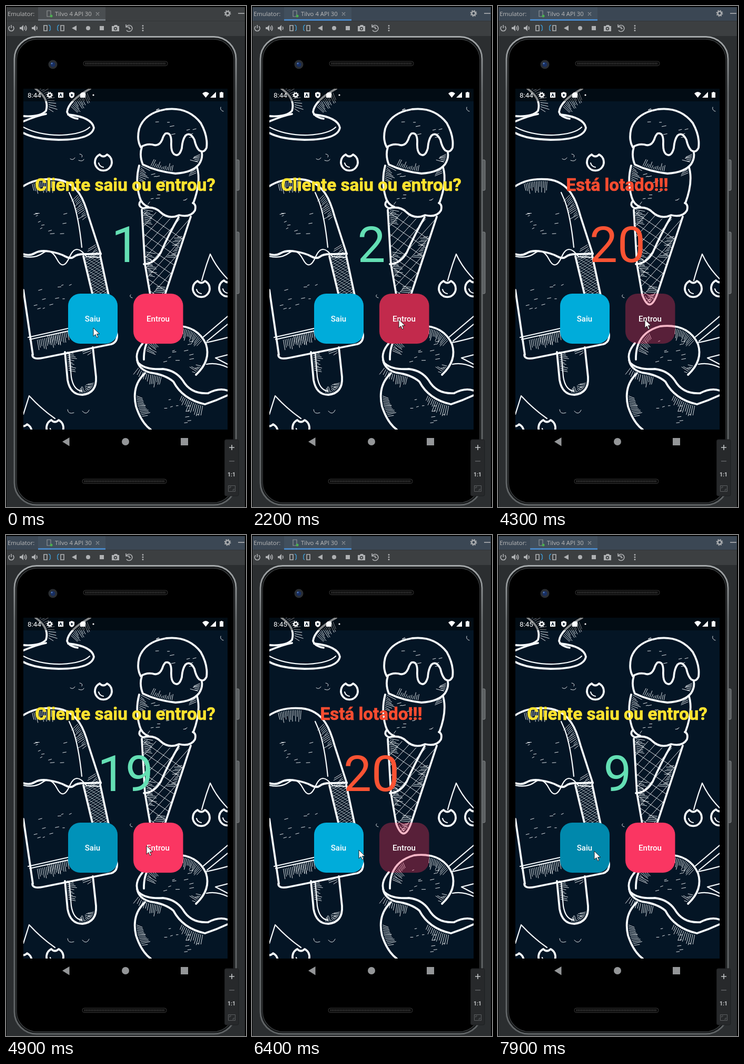
Write an HTML page that moves like this. It is 456x951 px and loops after 8 s.

```html
<!DOCTYPE html>
<html lang="pt">
<head>
<meta charset="utf-8">
<style>
html, body { margin: 0; width: 100%; height: 100%; overflow: hidden; background: #000 }
svg { display: block; width: 456px; height: 951px; font-family: Roboto, sans-serif }
.line { fill: none; stroke: #f6fafc; stroke-width: 3.8; stroke-linecap: round; stroke-linejoin: round }
.mid { stroke-width: 2.2 }
.thin { stroke-width: .9 }
.ui { font: 11.3px "Open Sans", sans-serif; fill: #bbb }
.icon { fill: none; stroke: #afb1b3; stroke-width: 1.6 }
.solid { fill: #afb1b3; stroke: none }
.mesh { fill: #080808; stroke: #353535 }
.dots { stroke: #3b3b3b; stroke-width: 4; stroke-dasharray: 1.5 1.5 }
.label { font-size: 15.1px; font-weight: 500; fill: #fff }
.center { text-anchor: middle }
#title { font-size: 33.2px; font-weight: 700; stroke-width: .7 }
</style>
</head>
<body>
<svg viewBox="0 0 456 951">
  <defs>
    <clipPath id="screen"><path d="M33 157H421V804H33Z"/></clipPath>
    <clipPath id="cone"><path d="M258 387L264 490L274 548Q288 580 302 548L351 400Q310 412 295 393Z"/></clipPath>
    <clipPath id="side"><path d="M148 474L180 472L195 548H164Z"/></clipPath>
    <linearGradient id="rim" x2="0" y2="1">
      <stop stop-color="#a4a8aa"/><stop offset=".12" stop-color="#6a6e70"/><stop offset="1" stop-color="#606466"/>
    </linearGradient>
    <g id="cherry">
      <path d="M-7 -14A16 16 0 1 0 7 -14Q0 -7 -7 -14"/>
      <path class="mid" d="M-9 2Q-7 9 0 10"/>
    </g>
  </defs>

  <!-- emulator window -->
  <path fill="#2b2e30" d="M1 57H454V951H1Z"/>
  <path fill="#3c3f41" d="M1 2H454V57H1Z"/>
  <path id="bar" d="M1 2H454V28H1Z"/>
  <path id="tab" d="M61 2H189V28H61Z"/>
  <path id="underline" d="M61 25H189V28H61Z"/>
  <path stroke="#323537" d="M1 28.5H454"/>
  <text class="ui" x="3" y="19">Emulator:</text>
  <text class="ui" x="93" y="19">Tilvo 4 API 30</text>
  <g class="icon">
    <path stroke-width="1.2" d="M78 9H85V20H78ZM171 12L177 18M177 12L171 18" opacity=".7"/>
    <circle cx="86" cy="19" r="2.5" fill="#4caf50" stroke="none"/>
    <circle cx="421" cy="14" r="3.6" stroke-width="2.4"/>
    <circle cx="421" cy="14" r="5.6" stroke-dasharray="2.2 2.2"/>
    <path d="M441 14H453"/>
    <path d="M7 38.5A5 5 0 1 0 13 38.5M10 36V42"/>
    <path class="solid" d="M26 40H29L33 36V48L29 44H26ZM49 40H52L56 36V48L52 44H49ZM134 37V47L125 42ZM178 38H186V46H178ZM201 38H205L206 36H211L212 38H215V48H201Z"/>
    <path d="M35 39Q37 42 35 45M37 37Q41 42 37 47M58 39Q60 42 58 45"/>
    <path d="M72 37H78V47H72ZM104 37H110V47H104Z"/>
    <path stroke="#3d94c8" d="M81 36Q85 37 84 43M82 47Q85 46 84 42M101 36Q97 37 98 43M100 47Q97 46 98 42"/>
    <circle class="solid" cx="156" cy="42" r="4"/>
    <circle cx="208" cy="43" r="2.4" stroke="#3c3f41"/>
    <path d="M229 39A6 6 0 1 1 229 46M228 35V40H233M234 39V43H237"/>
    <path stroke-width="3" stroke-linecap="round" stroke-dasharray="0 4.5" d="M260 37.5V47"/>
  </g>

  <!-- phone body -->
  <g fill="#5a5e60" stroke="#85898b">
    <rect x="437" y="292" width="6" height="58" rx="2"/>
    <rect x="437" y="429" width="6" height="117" rx="2"/>
  </g>
  <rect x="16" y="58.500" width="421" height="888.500" rx="42" fill="#141617" stroke="url(#rim)" stroke-width="3"/>
  <rect x="20" y="63" width="413" height="880" rx="39" fill="#000" stroke="#3a3d3f" stroke-width="1.400"/>
  <circle cx="89" cy="111" r="8.500" fill="#2a2e33"/>
  <circle cx="89" cy="111" r="4.500" fill="#172e61"/>
  <circle cx="87" cy="109" r="1.600" fill="#5278b8"/>
  <rect class="mesh" x="147" y="105" width="160" height="8.500" rx="4"/>
  <path class="dots" d="M151 109.200H304"/>
  <rect class="mesh" x="145" y="898" width="160" height="8.500" rx="4"/>
  <path class="dots" d="M149 902.200H302"/>

  <!-- wallpaper: data-side gives the side of an outline that is hatched -->
  <g clip-path="url(#screen)">
    <path fill="#041525" d="M33 157H421V804H33Z"/>
    <g class="line">
      <!-- cup -->
      <path d="M33 219Q60 208 76 205M118 206Q163 211 167 231Q163 254 100 254Q55 253 33 241"/>
      <path d="M56 157Q83 176 76 199Q65 211 33 209M160 157Q119 179 116 201Q119 211 136 214" data-side="-1"/>
      <path class="mid" d="M33 230Q64 246 106 245Q146 243 159 230"/>
      <!-- cone -->
      <path d="M256 268Q248 254 253 233Q263 203 304 196Q346 191 370 222Q384 247 381 269Q376 280 367 274Q361 268 358 254Q350 238 341 246Q335 254 334 270Q329 288 319 281Q313 276 314 258Q314 239 303 242Q299 246 297 253Q291 268 278 263Q266 261 256 268Z"/>
      <path d="M258 268Q253 284 260 301Q287 314 322 318Q355 316 367 300Q374 289 372 278" data-side="-1"/>
      <path d="M253 303Q245 333 254 363Q258 377 270 381" data-side="-1"/>
      <path d="M363 306Q371 334 356 374" data-side="1"/>
      <path d="M256 370Q249 379 260 384Q281 379 293 391Q309 406 329 397Q351 402 359 388Q362 377 355 374"/>
      <path d="M258 387L264 490L274 548Q288 585 302 548L351 400" data-side="-1"/>
      <path d="M262 490Q282 489 294 468Q310 432 328 401"/>
      <!-- popsicle -->
      <path d="M33 342Q57 326 94 329C138 333 150 374 157 400L180 471" data-side="1"/>
      <path d="M33 471Q45 475 55 469T83 466T112 475T129 476T148 471T180 470"/>
      <path class="mid" d="M33 475Q55 480 70 469T97 481T121 476T153 476L178 477"/>
      <path class="mid" d="M120 354L127 370Q138 400 144 458"/>
      <path d="M147 475L165 550M179 474L211 624Q212 638 200 642L70 668Q50 672 50 662M33 539L51 662"/>
      <path class="mid" d="M45 633L118 617M42 629L118 612" data-side="1"/>
      <path d="M112 657L117 710Q122 738 145 738Q173 735 171 704L165 648" data-side="-1"/>
      <path class="mid" d="M120 657L124 704Q128 729 144 731"/>
      <!-- cherries -->
      <path class="mid" d="M372 521Q379 495 388 471Q400 497 421 518M33 775L44 740Q67 765 93 783"/>
      <use href="#cherry" x="185" y="296"/>
      <use href="#cherry" x="371" y="536"/>
      <use href="#cherry" x="421" y="535"/>
      <use href="#cherry" x="93" y="800"/>
      <use href="#cherry" x="33" y="808"/>
      <!-- sundae -->
      <path d="M262 671Q261 621 308 608Q362 602 380 642Q390 673 361 700" data-side="1"/>
      <path d="M260 640Q243 660 251 677Q264 691 298 689Q323 692 336 711Q351 737 384 735Q405 724 421 730"/>
      <path d="M249 672Q252 690 274 696Q303 700 318 713Q336 747 378 756Q400 749 421 739" data-side="1"/>
      <path d="M264 697Q238 721 247 760Q257 791 275 804" data-side="-1"/>
      <path class="mid" d="M374 629L421 589M382 636L421 604M380 639Q399 635 421 629M381 680Q400 676 421 686M421 662L398 668L421 680"/>
      <path class="mid thin" d="M122 290Q127 294 131 288M140 281Q147 282 144 287M138 293Q146 296 148 291M117 766Q118 776 129 772M145 769Q153 778 158 767M237 548Q233 552 240 554M413 200Q406 198 408 192"/>
    </g>
    <path class="line thin" id="waffle" clip-path="url(#cone)"/>
    <path class="line thin" id="weave" clip-path="url(#side)" opacity=".7"/>
    <path class="line thin" id="hatch"/>
    <path fill="#000" opacity=".45" d="M33 157H421V181H33Z"/>
  </g>

  <!-- status and navigation bars -->
  <g fill="#fff">
    <text id="clock" x="41" y="174" font-size="13.4"></text>
    <circle cx="83" cy="169" r="3.400" fill="none" stroke="#fff" stroke-width="2.400"/>
    <circle cx="83" cy="169" r="5" fill="none" stroke="#fff" stroke-width="1.600" stroke-dasharray="2 1.9"/>
    <path d="M99 164H109V174H99ZM125 163L130 165V169Q130 173 125 175Q120 173 120 169V165ZM144 164H151V174H141V167Z"/>
    <path fill="#041525" d="M101 172L104 165L107 172H105.500L104 169L102.500 172ZM123.500 166.500L128 169L123.500 171.500Z"/>
    <circle cx="166" cy="169" r="1.600"/>
    <path d="M373 166Q379.500 160 386 166L379.500 174ZM399 163V174H388ZM406 164H408V163H411V164H413V174H406Z"/>
  </g>
  <path fill="#949698" d="M107 827L120.500 819V835.500ZM332 820H346V834H332Z"/>
  <circle cx="227" cy="827" r="7" fill="#949698"/>

  <!-- app -->
  <text id="title" class="center" x="226.500" y="351"></text>
  <text id="count" class="center" x="227" y="486" font-size="94.5"></text>
  <rect id="out" x="118" y="546" width="94" height="95" rx="23"/>
  <rect id="in" x="242" y="546" width="94.500" height="95" rx="23"/>
  <text class="label center" x="164.500" y="598.500">Saiu</text>
  <text class="label center" x="289" y="598.500">Entrou</text>

  <!-- zoom panel -->
  <rect x="415.500" y="823" width="26.500" height="107" rx="3" fill="#27292b" stroke="#1d1f20"/>
  <path stroke="#c4c6c8" stroke-width="1.600" d="M424 838H434M429 833V843"/>
  <path stroke="#5d6062" stroke-width="1.600" d="M424 864H434"/>
  <text class="center" x="428.500" y="893" font-size="10.500" font-weight="700" fill="#c4c6c8">1:1</text>
  <path fill="none" stroke="#5d6062" d="M422.500 910.500H435.500V921.500H422.500ZM425 916V913H428M433 916V919H430"/>

  <path id="cursor" fill="#fff" stroke="#111" stroke-width=".9" d="M0 0V16L3.900 12.500L6.500 18.500L9 17.500L6.500 11.600H11.700Z"/>
</svg>
<script>
const el = id => document.getElementById(id);
const set = (id, attrs) => { for (const k in attrs) el(id).setAttribute(k, attrs[k]); };
const ramp = (t, a, b) => Math.min(1, Math.max(0, (t - a) / (b - a)));
const mix = (a, b, k) => a + (b - a) * k;
const shade = (rgb, k) => `rgb(${rgb.map(c => Math.round(c * (1 - k)))})`;

let seed = 7;
const rand = () => (seed = seed * 16807 % 2147483647) / 2147483647;

// equal strokes, one below the other
function rows(x, y, step, n, dx, dy) {
  let d = '';
  for (let i = 0; i < n; i++) d += `M${x} ${y + step * i}l${dx} ${dy}`;
  return d;
}

// groups of short strokes along an outline, pointing to one side
function fringe(path) {
  const side = +path.dataset.side, phase = rand() * 6;
  let d = '';
  for (let s = 0; s < path.getTotalLength() - 1; s += 3.5) {
    if (Math.sin(s / 16 + phase) < .1) continue;
    const p = path.getPointAtLength(s), q = path.getPointAtLength(s + 1);
    const nx = (p.y - q.y) * side, ny = (q.x - p.x) * side, len = 6 + 12 * rand();
    d += `M${p.x + nx * 4} ${p.y + ny * 4}l${nx * len} ${ny * len + 4}`;
  }
  return d;
}

// flecks scattered round a centre
function flecks([x, y]) {
  let d = '';
  for (let i = 0; i < 11; i++)
    d += `M${x + 76 * (rand() - .5)} ${y + 60 * (rand() - .5)}l${3 + 5 * rand()} ${-2 * rand()}`;
  return d;
}

set('waffle', { d: rows(250, 385, 20, 11, 110, 74) + rows(250, 410, 21, 12, 100, -112) });
set('weave', { d: rows(140, 480, 5, 22, 60, -38) + rows(140, 450, 7, 15, 60, 38) });
const centres = [[85, 405], [90, 550], [320, 222], [310, 350], [325, 655], [335, 765]];
set('hatch', { d: [...document.querySelectorAll('[data-side]')].map(fringe).join('') + centres.map(flecks).join('') });

// pointer stops: time and place
const OUT = [167, 597], IN = [279, 595];
const stops = [
  [0, [166, 611]], [1000, [166, 611]], [1600, IN], [4300, IN], [4550, OUT], [4700, OUT],
  [4900, [267, 590]], [5050, IN], [5350, IN], [5700, OUT], [6100, OUT], [6400, [203, 598]],
  [6600, [183, 600]], [8000, [183, 600]]
];

function pointer(t) {
  const i = stops.findIndex(s => s[0] > t);
  const [[t0, from], [t1, to]] = [stops[i - 1], stops[i]];
  const k = ramp(t, t0, t1), ease = k * k * (3 - 2 * k);
  return from.map((v, j) => mix(v, to[j], ease));
}

// one client per click: in up to the limit, one out and in again, then out
const CLICK = 118, LIMIT = 20;
function clients(t) {
  if (t < 1700) return 1;
  if (t < 4700) return Math.min(LIMIT, Math.max(2, 2 + Math.floor((t - 2170) / CLICK)));
  if (t < 5200) return LIMIT - 1;
  return Math.min(LIMIT, LIMIT - 1 - Math.floor((t - 6690) / CLICK));
}

function draw(now) {
  const t = Math.floor(now % 8000 / 100) * 100;
  const n = clients(t), full = n === LIMIT, focus = t >= 1600;
  const titleColor = full ? '#fb4c30' : '#ffe32f';
  set('bar', { fill: focus ? '#3b4754' : '#3c3f41' });
  set('tab', { fill: focus ? '#414f5d' : '#4a4e51' });
  set('underline', { fill: focus ? '#4a88c7' : '#747a80' });
  el('clock').textContent = t < 5400 ? '8:44' : '8:45';
  el('title').textContent = full ? 'Está lotado!!!' : 'Cliente saiu ou entrou?';
  set('title', { fill: titleColor, stroke: titleColor });
  el('count').textContent = n;
  set('count', { fill: full ? '#fb5333' : '#64dfb4' });

  const inPress = full ? 0 : .27 * ramp(t, 1950, 2250) * (t < 4400) + .2 * ramp(t, 5000, 5200) * (t < 5200);
  const outPress = .2 * ramp(t, 4600, 4700) * (1 - ramp(t, 4800, 5200)) + .21 * ramp(t, 6600, 6900);
  set('in', { fill: shade([250, 54, 98], inPress), 'fill-opacity': full ? .34 : 1 });
  set('out', { fill: shade([0, 172, 218], outPress) });
  set('cursor', { transform: `translate(${pointer(t)})` });
}

function loop(now) {
  draw(now);
  requestAnimationFrame(loop);
}
draw(0);
requestAnimationFrame(loop);
</script>
</body>
</html>
```
